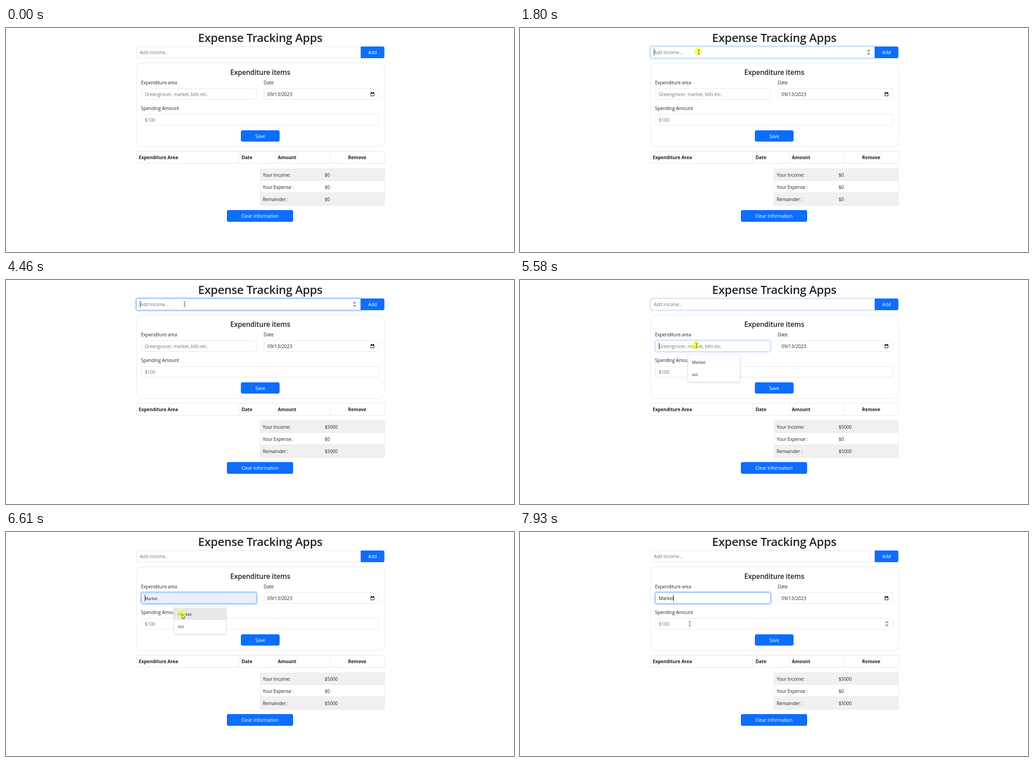
Animation, 1127 px wide and 497 px high, one loop 8 s. Source, as an HTML page with a canvas:

```html
<!DOCTYPE html>
<html lang="en">
<head>
<meta charset="utf-8">
<title>Expense Tracking Apps</title>
<style>
html, body { margin: 0; width: 100%; height: 100%; overflow: hidden; background: #fff; }
canvas { display: block; width: 1127px; height: 497px; }
</style>
</head>
<body>
<canvas id="stage"></canvas>
<script>
const W = 1127, H = 497, LOOP = 8000;
const INK = '#212529', MUTED = '#6c757d', LINE = '#e3e7ea', BLUE = '#0d6efd';
const canvas = document.getElementById('stage');
const ctx = canvas.getContext('2d');
const dpr = window.devicePixelRatio || 1;
canvas.width = W * dpr;
canvas.height = H * dpr;

const INCOME = { x: 289, y: 41, w: 498, h: 26, r: [4, 0, 0, 4] };
const AREA = { x: 300, y: 134, w: 256, h: 25, r: 4 };
const DATE = { x: 572, y: 134, w: 256, h: 25, r: 4 };
const AMOUNT = { x: 300, y: 191, w: 528, h: 25, r: 4 };

// start, end, from, bend, to
const MOVES = [
  [390, 1130, [1087, 486], [780, 291], [472, 95]],
  [1130, 1530, [472, 95], [425, 66], [395, 52]],
  [4800, 5190, [395, 52], [425, 95], [390, 144]],
  [5800, 5866, [390, 144], [390, 144], [391, 144]],
  [6000, 6270, [391, 144], [391, 163], [390, 182]],
  [7150, 7930, [390, 182], [384, 194], [375, 202]]
];
const CLICKS = [[1730, 1860], [5520, 5650], [6540, 6680]];
const KEYS = [[2610, '5'], [2940, '50'], [3140, '500'], [3400, '5000'], [4070, '']];
const BLINKS = [1750, 2610, 2940, 3140, 3400, 5530, 6680];

const clamp = v => Math.max(0, Math.min(1, v));
const smooth = v => { v = clamp(v); return v * v * (3 - 2 * v); };
const inside = (b, p) => p && p[0] >= b.x && p[0] < b.x + b.w && p[1] >= b.y && p[1] < b.y + b.h;
const latest = (list, t) => list.filter(v => v <= t).pop();

function pointer(t) {
  if (t < 388) return null;
  const tick = Math.floor((t + 14) * 0.015) / 0.015;
  const started = MOVES.filter(m => m[0] <= tick);
  const [t0, t1, a, b, c] = started.pop() || MOVES[0];
  const u = clamp((tick - t0) / (t1 - t0));
  const k = t0 < 1200 ? 1 - Math.pow(1 - u, 1.5) : smooth(u);
  return [0, 1].map(i =>
    Math.round((1 - k) * (1 - k) * a[i] + 2 * k * (1 - k) * b[i] + k * k * c[i]));
}

function text(str, x, y, { size = 11, weight = 400, color = INK, align = 'left' } = {}) {
  const px = size * 0.937;
  ctx.font = `${weight} ${px}px "Open Sans", "Noto Sans", sans-serif`;
  ctx.letterSpacing = `${-0.012 * px}px`;
  ctx.textAlign = align;
  ctx.fillStyle = color;
  ctx.fillText(str, x, y);
}

function round(x, y, w, h, r) {
  ctx.beginPath();
  ctx.roundRect(x, y, w, h, r);
}

function frame(b, fill, stroke) {
  round(b.x + 0.5, b.y + 0.5, b.w - 1, b.h - 1, b.r);
  ctx.fillStyle = fill;
  ctx.fill();
  ctx.strokeStyle = stroke;
  ctx.lineWidth = 1;
  ctx.stroke();
}

function input(b, focus = 0, fill = '#fff') {
  const mix = (from, to) => Math.round(from + (to - from) * focus);
  frame(b, fill, `rgb(${mix(227, 134)},${mix(231, 183)},${mix(234, 254)})`);
  if (!focus) return;
  const s = 2.75;
  const grow = [].concat(b.r).map(r => r ? r + s : 0);
  round(b.x - s, b.y - s, b.w + 2 * s, b.h + 2 * s, grow);
  ctx.roundRect(b.x, b.y, b.w, b.h, b.r);
  ctx.fillStyle = `rgba(13,110,253,${0.25 * focus})`;
  ctx.fill('evenodd');
}

function button(label, x, y, w, h, r = 4) {
  round(x, y, w, h, r);
  ctx.fillStyle = BLUE;
  ctx.fill();
  text(label, x + w / 2, y + h / 2 + 4, { color: '#fff', align: 'center' });
}

function rule(x, y, w, h) {
  ctx.fillStyle = LINE;
  ctx.fillRect(x, y, w, h);
}

function poly(points, fill) {
  ctx.beginPath();
  points.forEach(p => ctx.lineTo(p[0], p[1]));
  ctx.closePath();
  ctx.fillStyle = fill;
  ctx.fill();
}

function spinner(x, y) {
  ctx.fillStyle = '#f0f0f0';
  ctx.fillRect(x - 5, y - 7, 10, 14);
  for (const d of [-1, 1])
    poly([[x - 2.5, y + d * 2.5], [x + 2.5, y + d * 2.5], [x, y + d * 5.3]], '#444');
}

function calendar(x, y) {
  ctx.strokeStyle = ctx.fillStyle = '#111';
  ctx.lineWidth = 1;
  ctx.strokeRect(x - 3.5, y - 3, 7, 7.2);
  ctx.fillRect(x - 4, y - 3.5, 8, 2.6);
  ctx.fillRect(x - 2.8, y - 4.6, 1.1, 1.5);
  ctx.fillRect(x + 1.7, y - 4.6, 1.1, 1.5);
}

function caret(x, y) {
  ctx.fillStyle = '#222';
  ctx.fillRect(x, y, 1, 15);
}

function page() {
  text('Expense Tracking Apps', 564, 31, { size: 27.5, weight: 600, align: 'center' });
  frame({ x: 289, y: 77, w: 551, h: 186, r: 11 }, '#fff', LINE);
  text('Expenditure items', 564, 104, { size: 16.5, weight: 600, align: 'center' });
  text('Expenditure area', 299.5, 125);
  text('Date', 571.5, 125);
  text('Spending Amount', 299.5, 181.5);
  button('Save', 521, 227, 86, 25);
  button('Clear Information', 490, 404, 147, 26);

  frame({ x: 289, y: 273, w: 551, h: 28, r: 0 }, '#fff', LINE);
  for (const x of [516, 597, 719]) rule(x, 273, 1, 28);
  const bold = { weight: 700 };
  text('Expenditure Area', 294.5, 291, bold);
  text('Date', 522.5, 291, bold);
  text('Amount', 603, 291, bold);
  text('Remove', 779, 291, { weight: 700, align: 'center' });
}

function summary(t) {
  const total = t >= 4070 ? '$5000' : '$0';
  const rows = [['Your Income:', total], ['Your Expense :', '$0'], ['Remainder :', total]];
  rows.forEach(([name, value], i) => {
    const y = 312 + i * 27;
    ctx.fillStyle = i % 2 ? '#fff' : '#f0f0f0';
    ctx.fillRect(564, y, 275, 27);
    rule(564, y - 1 + (i ? 0 : 1), 276, 1);
    text(name, 569.5, y + 17.5);
    text(value, 707, y + 17.5);
  });
  rule(564, 393, 276, 1);
  rule(563.5, 312, 1, 82);
  rule(839, 312, 1, 82);
}

function fields(t, p) {
  const blink = latest(BLINKS, t);
  const caretOn = blink !== undefined && Math.floor((t - blink) / 530) % 2 === 0;
  const second = t >= 5520;

  button('Add', 787, 41, 52.5, 26, [0, 4, 4, 0]);
  input(INCOME, second ? 1 - smooth((t - 5520) / 100) : smooth((t - 1730) / 130));
  const key = KEYS.filter(k => k[0] <= t).pop();
  const typed = key ? key[1] : '';
  text(typed || 'Add income...', 297, 58, { color: typed ? INK : MUTED });
  if (caretOn && !second) caret(297 + Math.round(typed.length * 5.75), 46);
  if (inside(INCOME, p) || (t >= 1730 && !second)) spinner(773.5, 54);

  const chosen = t >= 6680;
  const preview = !chosen && t > 6000 && p[1] >= 168;
  input(AREA, smooth((t - 5520) / 130), preview ? '#e8f0fe' : '#fff');
  if (chosen) text('Market', 308, 151);
  else if (preview) text('Market', 308, 151, { size: 9.3 });
  else text('Greengrocer, market, bills etc.', 308, 151, { color: MUTED });
  if (caretOn && second) caret(chosen ? 340 : 308, 139);

  input(DATE);
  text('09/13/2023', 580, 151, { size: 11.3 });
  calendar(813, 146.5);

  input(AMOUNT);
  text('$100', 308, 207.5, { color: MUTED });
  if (inside(AMOUNT, p)) spinner(814, 203.5);
}

function suggestions(t, p) {
  if (t < 5560 || t >= 6880) return;
  ctx.save();
  ctx.globalAlpha = 1 - clamp((t - 6660) / 220);
  ctx.shadowColor = 'rgba(0,0,0,.22)';
  ctx.shadowBlur = 3 * dpr;
  ctx.shadowOffsetY = dpr;
  round(372.5, 165.5, 116, 61, 3);
  ctx.fillStyle = '#fff';
  ctx.fill();
  ctx.shadowColor = 'transparent';
  ctx.strokeStyle = '#dcdcdc';
  ctx.lineWidth = 0.7;
  ctx.stroke();
  poly([[382, 166.2], [388, 160.8], [394, 166.2]], '#f1f1f1');
  poly([[383, 166.8], [388, 162], [393, 166.8]], '#fff');
  if (p[1] >= 168) {
    ctx.fillStyle = '#e8e8e9';
    ctx.fillRect(373, 168, 115, 27);
  }
  text('Market', 381.5, 185.5, { size: 10 });
  text('sss', 381.5, 212.5, { size: 10 });
  ctx.restore();
}

function drawPointer(t, p) {
  if (!p) return;
  const [x, y] = p;
  if (CLICKS.some(([a, b]) => t >= a && t < b)) {
    ctx.beginPath();
    ctx.arc(x, y, 9, 0, 2 * Math.PI);
    ctx.fillStyle = 'rgba(255,250,30,.65)';
    ctx.fill();
  }
  if ([INCOME, AREA, DATE, AMOUNT].some(b => inside(b, p))) {
    ctx.fillStyle = '#4a4a4a';
    ctx.fillRect(x + 1, y - 3, 1, 9);
    for (const dy of [-4, 6]) {
      ctx.fillRect(x - 1, y + dy, 2, 1);
      ctx.fillRect(x + 2, y + dy, 2, 1);
    }
    return;
  }
  const shape = [[0, 0], [0, 9.5], [2.2, 7.6], [3.7, 11], [5.2, 10.3], [3.8, 7.1], [6.8, 6.8]];
  poly(shape.map(([a, b]) => [x + 0.5 + a, y + 0.5 + b]), '#fff');
  ctx.strokeStyle = '#222';
  ctx.lineWidth = 0.8;
  ctx.stroke();
}

function draw(now) {
  const t = now % LOOP;
  const p = pointer(t);
  ctx.setTransform(dpr, 0, 0, dpr, 0, 0);
  ctx.fillStyle = '#fff';
  ctx.fillRect(0, 0, W, H);
  page();
  summary(t);
  fields(t, p);
  suggestions(t, p);
  drawPointer(t, p);
  requestAnimationFrame(draw);
}

draw(0);
</script>
</body>
</html>
```
